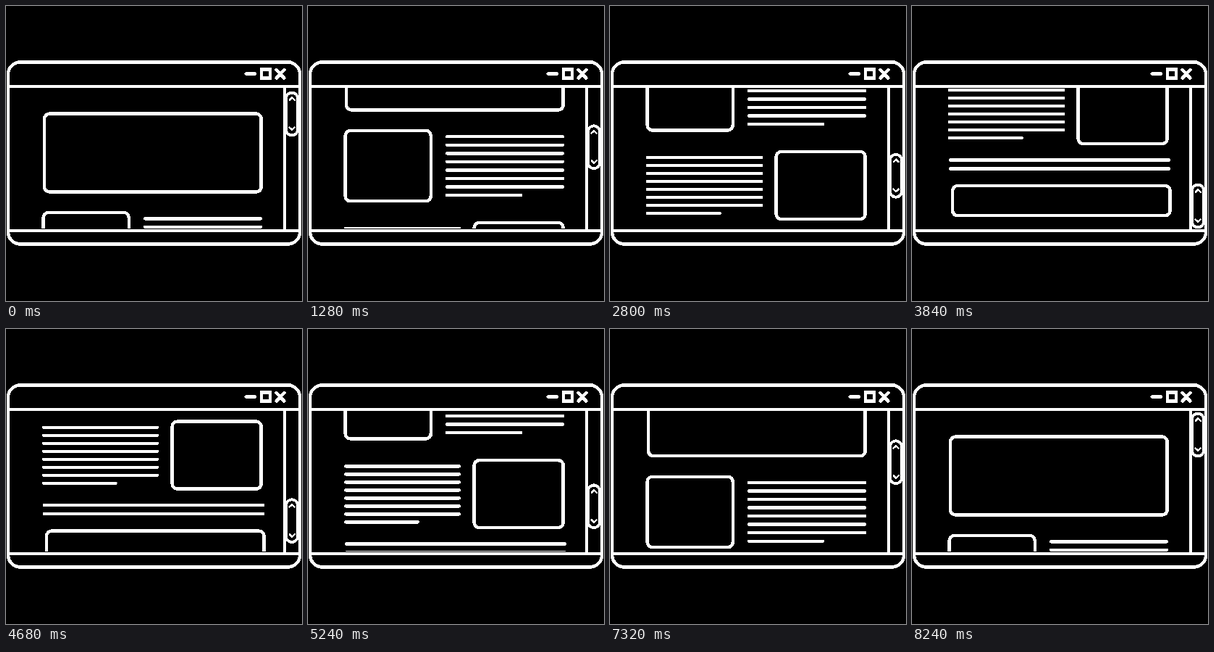
An HTML page with a canvas for the animation above (8.96 s loop, 409x407 px).

```html
<!DOCTYPE html>
<html lang="en">
<head>
<meta charset="utf-8">
<title>Scrolling window</title>
<style>
  html, body { margin: 0; width: 100%; height: 100%; overflow: hidden; background: #000; }
  canvas { display: block; width: 409px; height: 407px; }
</style>
</head>
<body>
<canvas id="stage" width="409" height="407"></canvas>
<script>
const W = 409, H = 407, LOOP = 8960, STEP = 40;
const LINE = 4.2, CUTOFF = 80;
const ctx = document.getElementById('stage').getContext('2d', { willReadFrequently: true });

// [time, page scroll, thumb top]
const keys = [
  [0, 0, 119.5], [1608, 142, 177],
  [2120, 142, 177], [3825, 315, 246.5],
  [4360, 315, 246.5], [6170, 142, 182.5],
  [6640, 142, 182.5], [8230, 0, 116.5],
  [LOOP, 0, 116.5]
];

function pose(t) {
  let i = 0;
  while (i < keys.length - 2 && t >= keys[i + 1][0]) i++;
  const a = keys[i], b = keys[i + 1];
  const p = (t - a[0]) / (b[0] - a[0]);
  return [a[1] + (b[1] - a[1]) * p, a[2] + (b[2] - a[2]) * p];
}

function box(x1, y1, x2, y2, r) {
  ctx.beginPath();
  ctx.roundRect(x1, y1, x2 - x1, y2 - y1, r);
  ctx.stroke();
}

function path(...pts) {
  ctx.beginPath();
  for (let i = 0; i < pts.length; i += 2) ctx.lineTo(pts[i], pts[i + 1]);
  ctx.stroke();
}

function paragraph(x1, x2, last, y, gap) {
  for (let i = 0; i < 8; i++) path(x1, y + i * gap, i < 7 ? x2 : last, y + i * gap);
}

function drawPage(scroll) {
  ctx.save();
  ctx.beginPath();
  ctx.rect(5, 113, 378, 194);
  ctx.clip();
  ctx.translate(0, -scroll);
  box(53, 148.6, 352.7, 256.5, 7);
  box(51.6, 285, 169.8, 382.3, 7);
  paragraph(192, 352, 294, 293.3, 11.53);
  paragraph(52, 209, 151.5, 420.2, 11);
  box(229.6, 412, 352.7, 505, 7);
  path(53, 527.5, 355, 527.5);
  path(53, 539.5, 355, 539.5);
  box(56, 563, 356.6, 604.2, 7);
  ctx.restore();
}

function drawFrame() {
  box(2.9, 77.4, 406.2, 328.5, 17);
  path(3, 111, 406, 111);
  path(3, 310, 406, 310);
  path(385, 111, 385, 310);
  path(331.5, 93.5, 344, 93.5);
  box(353, 87.3, 365, 99.7, 0);
  path(373.5, 88, 384.5, 99.5);
  path(384.5, 88, 373.5, 99.5);
}

function drawThumb(y) {
  ctx.lineWidth = 3.6;
  box(387, y, 403, y + 59, 8);
  ctx.lineWidth = 2.2;
  path(391.7, y + 10.3, 395.2, y + 7, 398.7, y + 10.3);
  path(391.7, y + 48, 395.2, y + 51.3, 398.7, y + 48);
}

// Turn soft edges into hard black and white
function harden() {
  const img = ctx.getImageData(0, 0, W, H);
  const px = new Uint32Array(img.data.buffer);
  for (let i = 0; i < px.length; i++) px[i] = (px[i] & 255) > CUTOFF ? 0xffffffff : 0xff000000;
  ctx.putImageData(img, 0, 0);
}

function draw() {
  const t = Math.floor(performance.now() % LOOP / STEP) * STEP;
  const [scroll, thumb] = pose(t);
  ctx.fillStyle = '#000';
  ctx.fillRect(0, 0, W, H);
  ctx.strokeStyle = '#fff';
  ctx.lineCap = 'round';
  ctx.lineWidth = LINE;
  drawPage(scroll);
  drawFrame();
  drawThumb(thumb);
  harden();
  requestAnimationFrame(draw);
}
draw();
</script>
</body>
</html>
```
